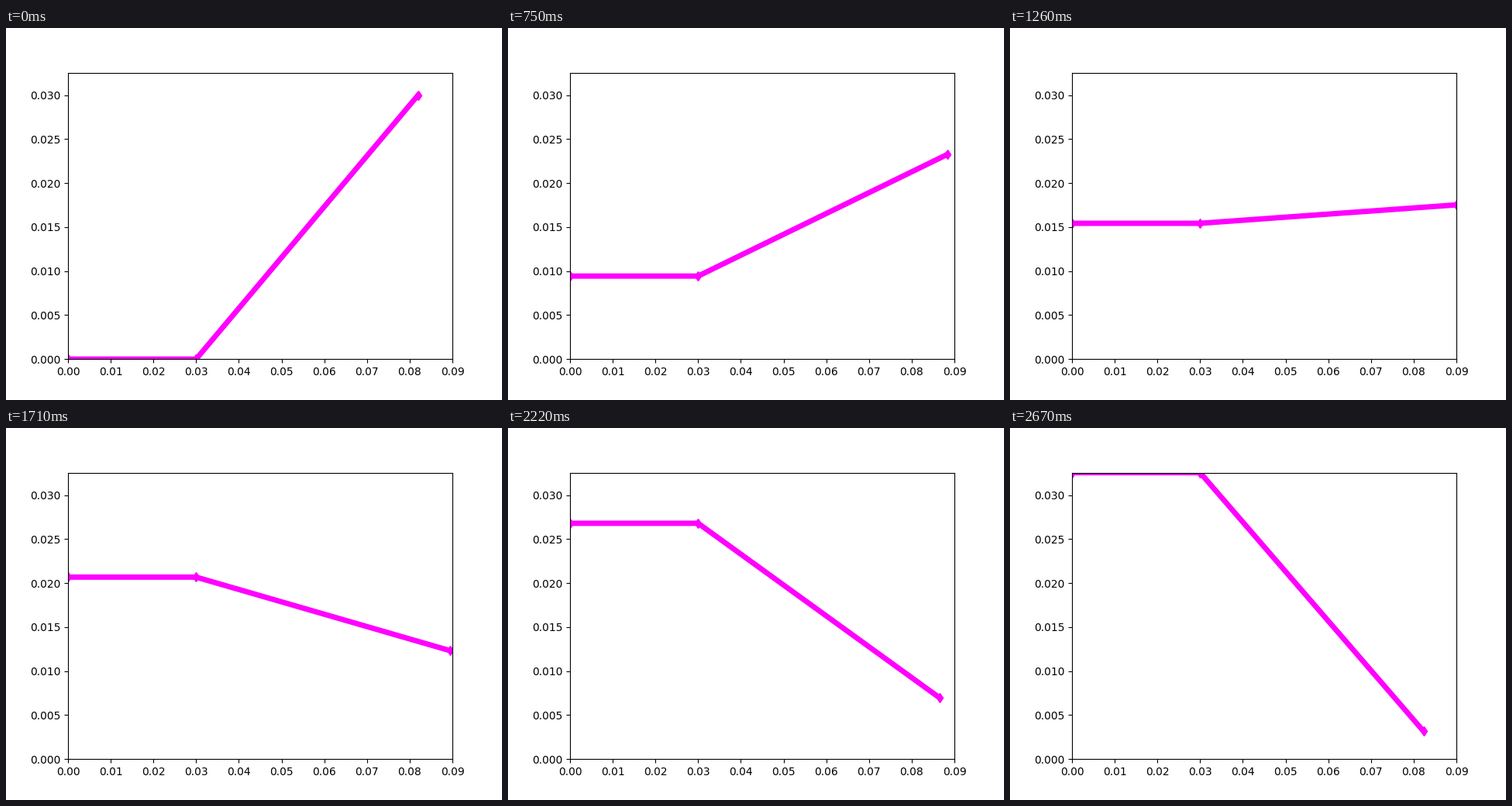
A matplotlib script for the animation above (2.7 s loop, 640 px wide and 480 px high).

```python
import numpy as np
import matplotlib.pyplot as plt
from matplotlib.animation import FuncAnimation

FRAMES = 90
ARM, ROD = 0.03, 0.06
START, STEP = 30, 60 / FRAMES  # degrees


def pose(i):
    """Joint positions after i steps; the arm rises at ARM / cos(angle)."""
    start, angle = np.radians([START, START - STEP * i])
    height = ARM * (np.arcsinh(np.tan(start)) - np.arcsinh(np.tan(angle)))
    xs = [0, ARM, ARM + ROD * np.cos(angle)]
    ys = [height, height, height + ROD * np.sin(angle)]
    return xs, ys


fig, ax = plt.subplots(figsize=(6.4, 4.8), dpi=100)
ax.set_xlim(0, ARM + ROD)
ax.set_ylim(0, pose(FRAMES - 1)[1][0])
linkage, = ax.plot(*pose(0), color="magenta", marker="d", linewidth=5)


def update(i):
    linkage.set_data(*pose(i))
    return linkage,


anim = FuncAnimation(fig, update, frames=FRAMES, interval=30,
                     repeat=True, repeat_delay=0)
plt.show()
```
